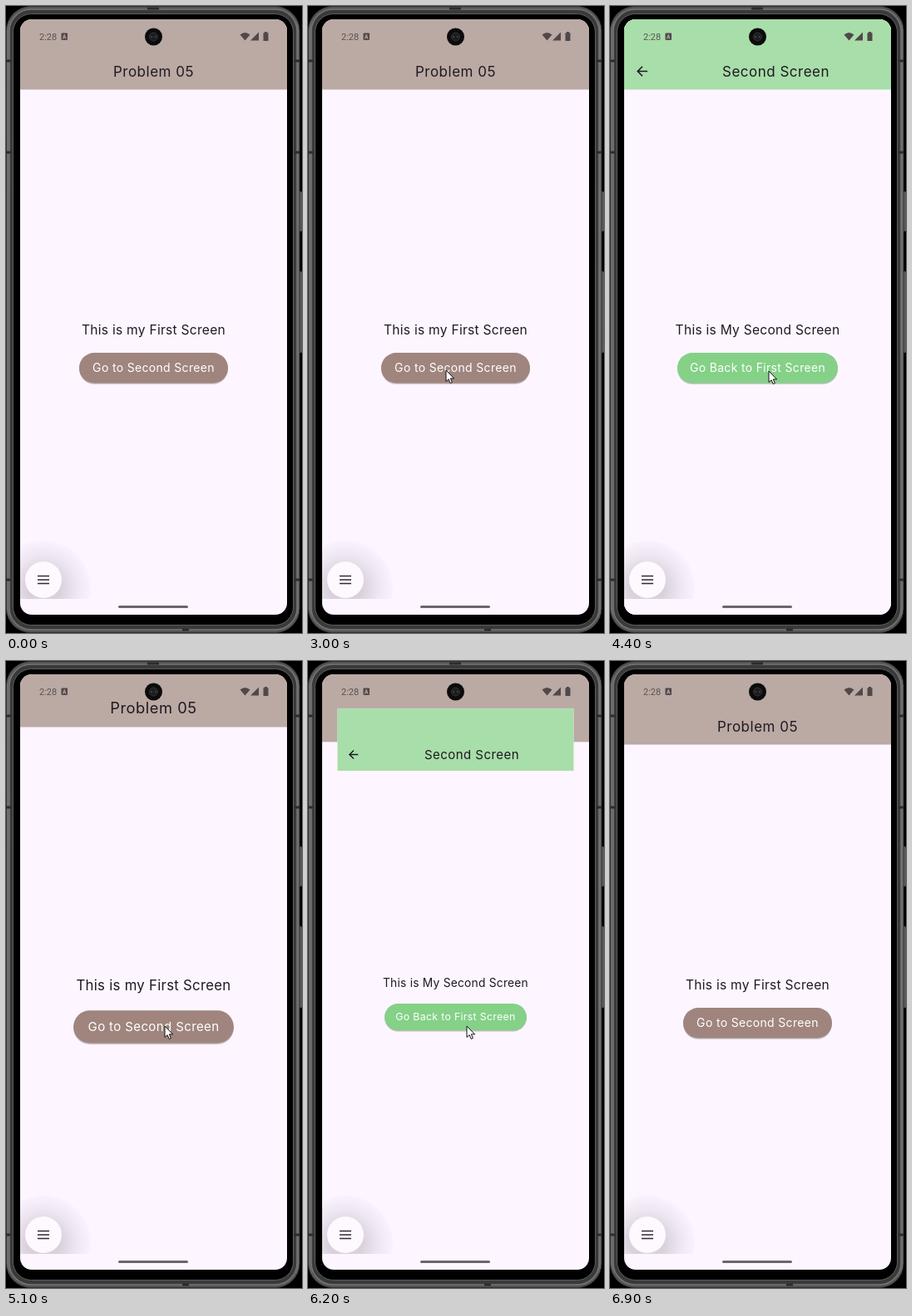
Recreate the animation shown at these times as an HTML page. Size 356x754 px, loop 7.7 s.

```html
<!DOCTYPE html>
<html lang="en">
<head>
<meta charset="utf-8">
<title>Two screens</title>
<style>
  html, body { margin: 0; width: 100%; height: 100%; overflow: hidden; background: #000; }
  svg { display: block; width: 356px; height: 754px; }
  text { font-family: Inter, "Open Sans", sans-serif; text-anchor: middle; fill: #1f1a20; }
  .title { font-size: 17px; letter-spacing: .5px; }
  .body { font-size: 15.6px; letter-spacing: .25px; }
  .label { font-size: 14px; letter-spacing: .33px; fill: #fff; }
  .clock { font: 11px Roboto, sans-serif; text-anchor: start; fill: #5b5250; }
  .page { transform-origin: 177.5px 374px; }
</style>
</head>
<body>
<svg viewBox="0 0 356 754">
  <defs>
    <clipPath id="screen"><rect x="17" y="16" width="321" height="716" rx="14"/></clipPath>
    <clipPath id="menuBox"><rect x="17" y="640" width="90" height="73"/></clipPath>
    <radialGradient id="halo">
      <stop offset=".35" stop-color="#2a2030" stop-opacity=".17"/>
      <stop offset=".7" stop-color="#2a2030" stop-opacity=".07"/>
      <stop offset="1" stop-color="#2a2030" stop-opacity=".015"/>
    </radialGradient>
    <linearGradient id="rim">
      <stop offset="0" stop-color="#777"/>
      <stop offset=".015" stop-color="#555"/>
      <stop offset=".985" stop-color="#555"/>
      <stop offset="1" stop-color="#777"/>
    </linearGradient>
  </defs>

  <!-- device -->
  <g fill="#5a5a5a">
    <rect x="350" y="223" width="6" height="48" rx="1.5"/>
    <rect x="350" y="319" width="6" height="98" rx="1.5"/>
  </g>
  <rect x=".5" y=".5" width="352.5" height="753" rx="29" fill="url(#rim)" stroke="#303030"/>
  <rect x="4" y="4" width="346" height="746" rx="26" fill="#3a3a3a" stroke="#747474" stroke-width="1.5"/>
  <rect x="8.5" y="9.5" width="337" height="735" rx="22" fill="#000" stroke="#5c5c5c"/>
  <path d="M0 66h6M0 176h6M0 690h6M347 66h6M347 176h6M347 690h6M170 3h14M212 750h8" stroke="#2c2c2c" stroke-width="3"/>

  <g clip-path="url(#screen)">
    <g id="pages"></g>
    <g clip-path="url(#menuBox)"><circle cx="45" cy="700" r="57" fill="url(#halo)"/></g>
    <circle cx="45" cy="690" r="22" fill="#fef8ff"/>
    <path d="M38 685.5h14M38 690h14M38 694.5h14" stroke="#302b33" stroke-width="1.5"/>
    <rect x="135" y="721" width="84" height="3" rx="1.5" fill="#6c656f"/>

    <!-- status bar -->
    <text class="clock" x="40" y="40.5">2:28</text>
    <g fill="#51484a">
      <rect x="66.5" y="32.5" width="7.5" height="8.5" rx="1"/>
      <path d="M281.500 34.500Q287.500 29.500 293.500 34.500L287.500 41.500Z"/>
      <path d="M294 41.500L304 31.500V41.500Z"/>
      <path d="M311 31h3v1.300h1.500V42h-6V32.300h1.500Z"/>
    </g>
    <path d="M68.500 39.500l1.750-5 1.750 5m-2.800-1.600h2.100" fill="none" stroke="#c5b8b4" stroke-width=".9"/>
    <circle cx="177.500" cy="37" r="10.500" fill="#0b0b0b"/>
    <circle cx="177.500" cy="37" r="5" fill="#1d1d1f" stroke="#333"/>
    <path d="M174.500 37h1.500M179 37h1.500" stroke="#555" stroke-width="1.500"/>
  </g>

  <path id="cursor" d="M0 0V13.500L3.100 10.700 5.200 15.500 7.400 14.500 5.300 9.900H9.600Z" fill="#fff" stroke="#111" stroke-width="1"/>
</svg>

<script>
const LOOP = 7700, STEP = 100, ZOOM = 300;
const $ = id => document.getElementById(id);
const clamp = v => Math.min(1, Math.max(0, v));

const screens = [
  { title: 'Problem 05', titleX: 177.5, body: 'This is my First Screen', label: 'Go to Second Screen',
    x: 88, w: 179, bar: '#bba9a4', button: '#9f857d', splash: '#7a4fa0', arrow: '' },
  { title: 'Second Screen', titleX: 199.5, body: 'This is My Second Screen', label: 'Go Back to First Screen',
    x: 81, w: 193, bar: '#a8dea9', button: '#84d187', splash: '#6a9a80',
    arrow: '<path d="M45 78.500H33.500M39 72.800L33.300 78.500L39 84.200" fill="none" stroke="#1f1a20" stroke-width="1.600"/>' }
];

const pageMarkup = (s, i) => `
  <g class="page">
    <rect x="17" y="16" width="321" height="716" fill="#fdf5ff"/>
    <rect x="17" y="16" width="321" height="84.500" fill="${s.bar}"/>
    ${s.arrow}
    <text class="title" x="${s.titleX}" y="85">${s.title}</text>
    <text class="body" x="177.500" y="394.500">${s.body}</text>
    <clipPath id="clip${i}"><rect x="${s.x}" y="417" width="${s.w}" height="36.500" rx="18.250"/></clipPath>
    <rect x="${s.x}" y="418.300" width="${s.w}" height="36.500" rx="18.250" fill="#000" opacity=".24"/>
    <rect x="${s.x}" y="417" width="${s.w}" height="36.500" rx="18.250" fill="${s.button}"/>
    <circle class="splash" cx="191" cy="439" clip-path="url(#clip${i})" fill="${s.splash}" opacity=".2"/>
    <text class="label" x="177.500" y="440">${s.label}</text>
  </g>`;

$('pages').innerHTML = screens.map(pageMarkup).join('');
const pages = [...document.querySelectorAll('.page')];
const splashes = [...document.querySelectorAll('.splash')];

// Start of each page change, and the page it leads to
const changes = [[4100, 1], [5000, 0], [6100, 1], [6600, 0]];

// Pointer: time, x, y
const path = [
  [100, 200, 83], [300, 132, 215], [400, 104, 290], [500, 101, 345], [600, 118, 395],
  [800, 160, 436], [900, 166, 438], [3200, 166, 438], [3400, 204, 463], [3500, 204, 463],
  [3800, 191, 439], [6500, 191, 439], [6600, 192.5, 439], [6900, 192.5, 439]
];

function pointerAt(t) {
  const i = path.findIndex(k => k[0] > t);
  if (i < 1) return null;
  const [t0, x0, y0] = path[i - 1], [t1, x1, y1] = path[i];
  const p = (t - t0) / (t1 - t0);
  return [x0 + (x1 - x0) * p, y0 + (y1 - y0) * p];
}

// Slow start up to 40 %, then a fast settle
const ease = p => p < .4 ? .4 * (p / .4) ** 3 : 1 - .6 * (1 - (p - .4) / .6) ** 4;

function setPage(i, scale, opacity) {
  pages[i].style.transform = `scale(${scale})`;
  pages[i].style.opacity = opacity;
}

function draw(t) {
  const [start, to] = changes.filter(c => c[0] <= t).pop() || [-ZOOM, 0];
  const p = clamp((t - start) / ZOOM), e = ease(p);
  if (to) {
    setPage(0, 1 + .05 * e, 1);
    setPage(1, .85 + .15 * e, clamp((p - .125) / .125));
  } else {
    setPage(0, p ? 1.1 - .1 * e : 1, 1);
    setPage(1, 1 - .1 * e, 1 - clamp((p - .08) / .12));
  }

  splashes.forEach(s => s.setAttribute('r', 0));
  for (const [at, next] of changes) {
    const age = t - at + STEP;
    if (age >= 0 && age < ZOOM && at !== 6600) splashes[1 - next].setAttribute('r', 18 + age * .45);
  }

  const tip = pointerAt(t);
  $('cursor').style.display = tip ? '' : 'none';
  if (tip) $('cursor').setAttribute('transform', `translate(${tip})`);
}

const origin = performance.now();
function tick() {
  const t = (performance.now() - origin) % LOOP;
  draw(Math.floor(t / STEP) * STEP);
  requestAnimationFrame(tick);
}
tick();
</script>
</body>
</html>
```
